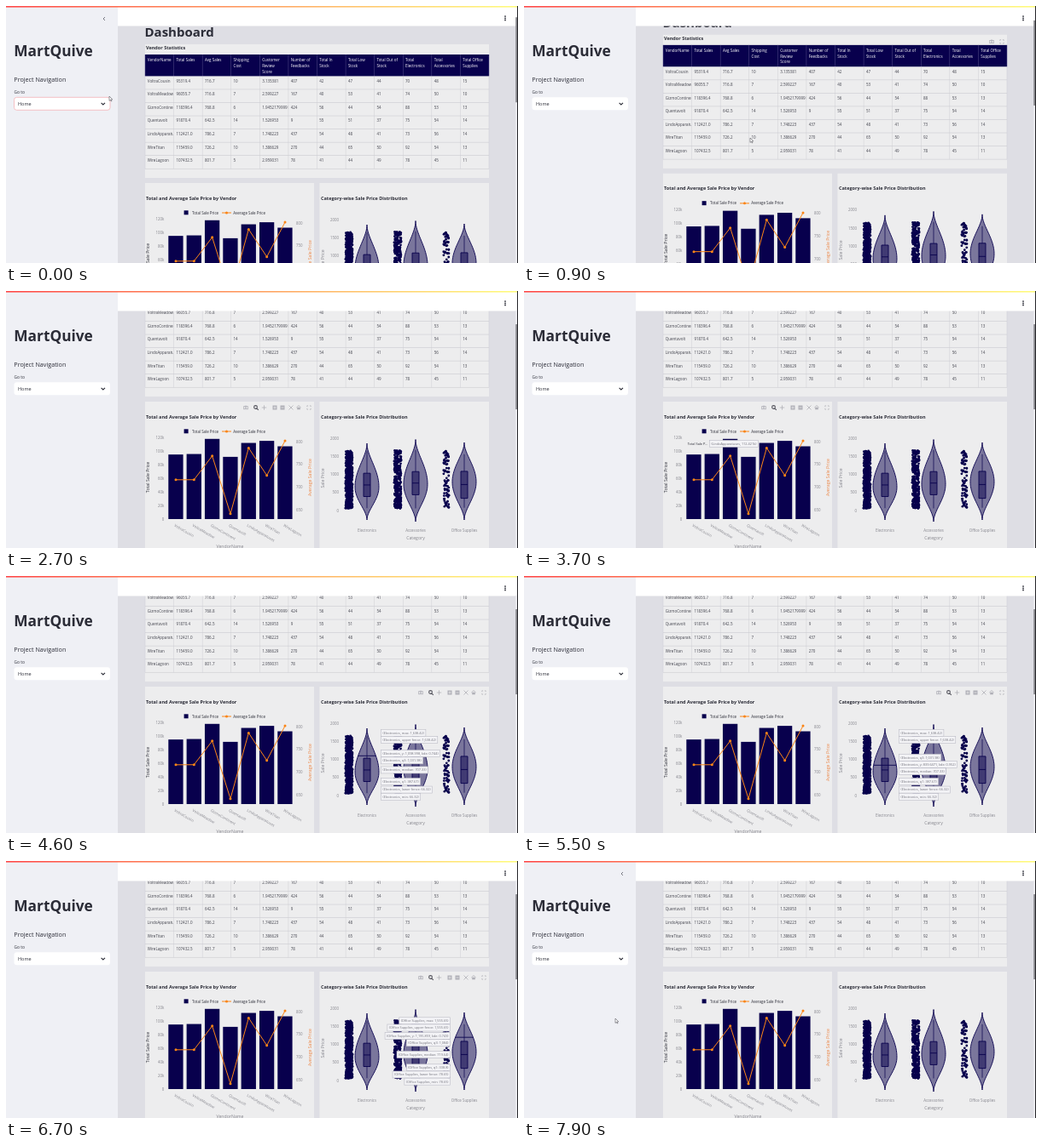
Write an HTML page with a canvas that moves like this. It is 600x302 px and loops after 8000 ms.

```html
<!DOCTYPE html>
<html lang="en">
<head>
<meta charset="utf-8">
<title>Dashboard</title>
<style>
  html, body { margin: 0; width: 100%; height: 100%; overflow: hidden; background: #dedee4; }
  canvas { display: block; width: 600px; height: 302px; }
</style>
</head>
<body>
<canvas id="stage"></canvas>
<script>
const canvas = document.getElementById('stage');
const ctx = canvas.getContext('2d');
const ratio = window.devicePixelRatio || 1;
canvas.width = 600 * ratio;
canvas.height = 302 * ratio;

const LOOP = 8000;
const NAVY = '#08004d', ORANGE = '#fb8516', INK = '#2b2c37', GRAY = '#85858d';
const CARD = '#ededee', PAGE = '#dedee4', SIDE = '#eff0f5';

const columns = ['VendorName', 'Total Sales', 'Avg Sales', 'Shipping|Cost', 'Customer|Review|Score',
  'Number of|Feedbacks', 'Total In|Stock', 'Total Low|Stock', 'Total Out of|Stock',
  'Total|Electronics', 'Total|Accessories', 'Total Office|Supplies'];
const vendors = [
  'VoltraCousin 95319.4 716.7 10 3.135381 407 42 47 44 70 48 15',
  'VoltraMeadow 96055.7 716.8 7 2.599227 167 40 53 41 74 50 10',
  'GizmoContinent 118396.4 768.8 6 1.945217999999 424 56 44 54 88 53 13',
  'Quentavolt 91870.4 642.5 14 1.526953 9 55 51 37 75 54 14',
  'LindoApparatuses 112421.0 786.2 7 1.748223 437 54 48 41 73 56 14',
  'WireTitan 115459.0 726.2 10 1.386629 270 44 65 50 92 54 13',
  'WireLagoon 107432.5 801.7 5 2.959031 78 41 44 49 78 45 11'
].map(row => row.split(' '));

const violins = [
  { name: 'Electronics', x: 423, top: 179, mode: 230.3, bottom: 269, dots: 560, side: 1,
    max: 1638.42, q3: 1031.98, median: 707.33, q1: 387.67, min: 66.32 },
  { name: 'Accessories', x: 480, top: 174.5, mode: 227, bottom: 271, dots: 340, side: -1,
    max: 1674.2, q3: 1077.05, median: 760.18, q1: 437.2, min: 60.41 },
  { name: 'Office Supplies', x: 537, top: 178, mode: 224.4, bottom: 269, dots: 85, side: -1,
    max: 1555.65, q3: 1084, median: 719.64, q1: 338.8, min: 78.65 }
];

// Keys are [time, ...values]
const scrollKeys = [[0, 78], [800, 78], [900, 67], [1400, 0], [LOOP, 0]];
const pointerKeys = [[0, 121, 106], [200, 121, 106], [750, 265, 155], [1900, 265, 155],
  [2400, 241, 200], [2900, 284, 188], [3900, 284, 200], [4400, 423, 210],
  [5400, 423, 222.315], [5800, 423, 222.315], [6300, 537, 215], [6600, 537, 207.176],
  [6900, 537, 207.176], [7600, 107, 185], [LOOP, 107, 185]];

const smooth = k => k * k * (3 - 2 * k);
function sample(keys, t, ease = k => k) {
  const i = keys.findIndex(key => key[0] > t);
  const a = keys[i - 1], b = keys[i];
  const k = ease((t - a[0]) / (b[0] - a[0]));
  return a.slice(1).map((v, n) => v + (b[n + 1] - v) * k);
}

function seeded(seed) {
  return () => (seed = (seed * 16807) % 2147483647) / 2147483647;
}

function rect(x, y, w, h, fill) {
  ctx.fillStyle = fill;
  ctx.fillRect(x, y, w, h);
}

function stroke(points, color, width = 1, fill) {
  ctx.beginPath();
  points.forEach(([x, y]) => ctx.lineTo(x, y));
  if (fill) { ctx.closePath(); ctx.fillStyle = fill; ctx.fill(); }
  ctx.strokeStyle = color;
  ctx.lineWidth = width;
  ctx.stroke();
}

function dot(x, y, r, fill) {
  ctx.beginPath();
  ctx.arc(x, y, r, 0, Math.PI * 2);
  ctx.fillStyle = fill;
  ctx.fill();
}

function setFont(size, weight = 400) {
  ctx.font = `${weight} ${size}px "Open Sans", "Noto Sans", sans-serif`;
}

// y is the middle of the capital letters
function text(str, x, y, size, color = INK, align = 'left', weight = 400) {
  setFont(size, weight);
  ctx.textAlign = align;
  ctx.fillStyle = color;
  ctx.fillText(str, x, y + size * 0.36);
}

function turned(str, x, y, angle, size, color, align) {
  ctx.save();
  ctx.translate(x, y);
  ctx.rotate(angle * Math.PI / 180);
  text(str, 0, 0, size, color, align);
  ctx.restore();
}

const icons = {
  camera(x, y) { ctx.strokeRect(x - 2.3, y - 1.4, 4.6, 3.2); rect(x - 1, y - 2.2, 2, 1, ctx.strokeStyle); dot(x, y + .2, .9, ctx.strokeStyle); },
  zoom(x, y) {
    ctx.beginPath(); ctx.arc(x - .5, y - .5, 1.9, 0, 7);
    ctx.moveTo(x + .8, y + .8); ctx.lineTo(x + 2.8, y + 2.8); ctx.stroke();
  },
  pan(x, y) {
    ctx.beginPath(); ctx.moveTo(x - 2.7, y); ctx.lineTo(x + 2.7, y);
    ctx.moveTo(x, y - 2.7); ctx.lineTo(x, y + 2.7); ctx.stroke();
  },
  plus(x, y) { rect(x - 2.5, y - 2.5, 5, 5, ctx.strokeStyle); rect(x - 1.6, y - .35, 3.2, .7, CARD); rect(x - .35, y - 1.6, .7, 3.2, CARD); },
  minus(x, y) { rect(x - 2.5, y - 2.5, 5, 5, ctx.strokeStyle); rect(x - 1.6, y - .35, 3.2, .7, CARD); },
  fit(x, y) {
    ctx.beginPath(); ctx.moveTo(x - 2.5, y - 2.5); ctx.lineTo(x + 2.5, y + 2.5);
    ctx.moveTo(x + 2.5, y - 2.5); ctx.lineTo(x - 2.5, y + 2.5); ctx.stroke();
  },
  home(x, y) { rect(x - 1.8, y - .3, 3.6, 2.6, ctx.strokeStyle); stroke([[x - 2.7, y], [x, y - 2.5], [x + 2.7, y]], ctx.strokeStyle, .8); },
  full(x, y) {
    for (const sx of [-1, 1]) for (const sy of [-1, 1])
      stroke([[x + sx * .9, y + sy * 2.2], [x + sx * 2.2, y + sy * 2.2], [x + sx * 2.2, y + sy * .9]], ctx.strokeStyle, .7);
  }
};
const chartTools = { camera: 0, zoom: 12, pan: 21.5, plus: 34, minus: 43, fit: 53, home: 62, full: 74 };

function toolbar(x, y, tools) {
  for (const name in tools) {
    const active = name === 'zoom';
    ctx.strokeStyle = active ? '#55555e' : '#b0b0b7';
    ctx.lineWidth = active ? 1.1 : .8;
    icons[name](x + tools[name], y);
  }
}

// side is the direction in which the box extends from x; returns its far edge
function label(str, x, y, side) {
  setFont(3.85);
  const width = ctx.measureText(str).width + 4;
  const left = side > 0 ? x : x - width;
  rect(left, y - 4, width, 8, '#f3f3f6');
  ctx.strokeStyle = '#bcbcc6';
  ctx.lineWidth = .6;
  ctx.strokeRect(left, y - 4, width, 8);
  text(str, left + 2, y, 3.85, '#73737d');
  return x + side * width;
}

function drawTable(hovered) {
  text('Dashboard', 162.5, -47.7, 15, INK, 'left', 700);
  rect(163, -33, 403, 157, CARD);
  text('Vendor Statistics', 164, -29, 5.5, INK, 'left', 700);
  const step = 403 / 12, rowH = 15.55, top = 4.4;
  rect(163, -21, 403, 25.4, NAVY);
  for (let i = 0; i <= 12; i++) {
    rect(163 + step * i - .25, -21, .5, 25.4, '#55508a');
    rect(163 + step * i - .25, top, .5, rowH * 7, '#cfcfd5');
  }
  for (let r = 1; r <= 7; r++) rect(163, top + r * rowH - .3, 403, .6, '#cbcbd1');
  columns.forEach((title, i) => {
    const x = 163 + step * i;
    title.split('|').forEach((line, n) => text(line, x + 2.8, -14.5 + n * 6.7, 4.5, '#fff'));
    ctx.save();
    ctx.beginPath();
    ctx.rect(x, top, step - .6, 112);
    ctx.clip();
    vendors.forEach((row, r) => text(row[i], x + 2.8, 10.2 + r * rowH, 4.5, '#41424c'));
    ctx.restore();
  });
  if (hovered) toolbar(548, -25, { camera: 0, full: 12 });
}

const barX = i => 199 + 21.33 * i;
const barTop = i => 268 - vendors[i][1] / 120000 * 95.5;

function drawBars(hovered) {
  rect(163, 130, 198, 300, CARD);
  text('Total and Average Sale Price by Vendor', 164, 147.6, 5.52, INK, 'left', 700);
  rect(208.6, 162.3, 5, 5, NAVY);
  text('Total Sale Price', 218, 165, 4.45);
  stroke([[253, 165], [264, 165]], ORANGE, 1);
  dot(258.5, 165, 1.5, ORANGE);
  text('Average Sale Price', 266.3, 165, 4.45);

  for (let k = 0; k <= 6; k++) text(k ? k * 20 + 'k' : '0', 185.3, 268 - k * 15.92, 4.4, GRAY, 'right');
  for (let k = 0; k < 4; k++) text(800 - k * 50, 340, 177 + k * 26.9, 4.4, GRAY);
  turned('Total Sale Price', 166.5, 219, -90, 5.2, INK, 'center');
  turned('Average Sale Price', 356.5, 219, -90, 5.2, '#ec8748', 'center');

  vendors.forEach((row, i) => {
    rect(barX(i) - 8.7, barTop(i), 17.3, 268 - barTop(i), NAVY);
    turned(row[0], barX(i) - 1.5, 275, 30, 4.35, GRAY, 'left');
  });
  const line = vendors.map((row, i) => [barX(i), 177 + (800 - row[2]) * .538]);
  stroke(line, ORANGE, 1);
  line.forEach(([x, y]) => dot(x, y, 1.5, ORANGE));
  text('VendorName', 262.5, 300.5, 5.2, GRAY, 'center');
  if (hovered) toolbar(281, 137, chartTools);
}

function barHover(x, y) {
  const i = vendors.findIndex((_, n) => Math.abs(x - barX(n)) < 8.7 && y > barTop(n) && y < 268);
  if (i < 0) return;
  const side = i > 2 ? -1 : 1;
  const far = label(`(${vendors[i][0]}, ${vendors[i][1] / 1000}k)`, barX(i) + side * 10, barTop(i) + .8, side);
  text('Total Sale P...', far + side * 2.5, barTop(i) + .6, 3.9, INK, side < 0 ? 'right' : 'left');
}

const priceY = v => 258 - v * .0425;
function density(v, y) {
  const u = (y - v.mode) / ((y < v.mode ? v.top : v.bottom) - v.mode);
  return (1 - u * u) ** 2;
}

function drawViolins(hovered) {
  rect(367.5, 130, 198.5, 300, CARD);
  text('Category-wise Sale Price Distribution', 369, 147.6, 5.52, INK, 'left', 700);
  for (let k = 0; k <= 4; k++) text(k * 500, 390, priceY(k * 500), 4.4, GRAY, 'right');
  turned('Sale Price', 371.5, 220, -90, 5.2, GRAY, 'center');
  violins.forEach((v, n) => {
    const rand = seeded(71 + n * 997);
    const spread = n < 2 ? 8 : 6.4;
    for (let i = 0; i < v.dots; i++)
      dot(v.x - 21 + (rand() - .5) * spread, priceY(v.min + rand() ** 1.12 * (1665 - v.min)), 1.4, NAVY);

    const edge = [];
    for (let k = 0; k <= 60; k++) {
      const y = v.top + (v.bottom - v.top) * k / 60;
      edge.push([density(v, y) * 14, y]);
    }
    stroke([...edge.map(([w, y]) => [v.x + w, y]), ...edge.reverse().map(([w, y]) => [v.x - w, y])],
      NAVY, .9, 'rgba(8,0,77,.5)');
    const [max, q3, median, q1, min] = [v.max, v.q3, v.median, v.q1, v.min].map(priceY);
    stroke([[v.x, max], [v.x, q3]], NAVY, .7);
    stroke([[v.x, q1], [v.x, min]], NAVY, .7);
    stroke([[v.x - 4, q3], [v.x + 4, q3], [v.x + 4, q1], [v.x - 4, q1]], NAVY, .9, 'rgba(8,0,77,.5)');
    stroke([[v.x - 4, median], [v.x + 4, median]], NAVY, .9);
    text(v.name, v.x, 281, 4.4, GRAY, 'center');
  });
  text('Category', 480, 290.3, 5.2, GRAY, 'center');
  if (hovered) toolbar(486, 137, chartTools);
}

function violinHover(x, y) {
  const v = violins.find(item => Math.abs(x - item.x) < 14 && y > item.top && y < item.bottom);
  if (!v) return;
  const num = value => value.toLocaleString('en-US', { maximumSignificantDigits: 7 });
  const value = (258 - y) / .0425;
  const tags = [['max', v.max], ['upper fence', v.max], ['q3', v.q3], ['median', v.median],
    ['q1', v.q1], ['lower fence', v.min], ['min', v.min]]
    .map(([key, val]) => ({ str: `${key}: ${num(val)}`, y: priceY(val) }));
  tags.push({ str: `y: ${num(value)}, kde: ${density(v, y).toFixed(3)}`, y });
  tags.sort((a, b) => a.y - b.y);
  // Push overlapping labels apart
  for (let pass = 0; pass < 40; pass++)
    for (let i = 1; i < tags.length; i++) {
      const push = (8.2 - tags[i].y + tags[i - 1].y) / 2;
      if (push > 0) { tags[i].y += push; tags[i - 1].y -= push; }
    }
  const half = density(v, y) * 14;
  stroke([[v.x - half, y], [v.x + half, y]], NAVY, .9);
  tags.forEach(tag => label(`(${v.name}, ${tag.str})`, v.x + v.side * 16.5, tag.y, v.side));
}

function drawHeader(offset) {
  rect(131, 0, 469, 23.5, '#fff');
  for (let k = -1; k <= 1; k++) dot(585, 14.3 + k * 2.2, .9, INK);
  rect(597, 23.5, 3, 279, '#ececf0');
  rect(597.2, (118 - offset) * .331, 1.8, 100, '#85858a');
  rect(599, 0, 1, 302, '#26262a');
}

function drawSidebar(x, y) {
  rect(0, 0, 131, 302, SIDE);
  text('MartQuive', 9.3, 53, 17.3, INK, 'left', 700);
  text('Project Navigation', 9.3, 86, 7.2);
  text('Go to', 9.5, 101, 4.9);
  ctx.beginPath();
  ctx.roundRect(9.5, 107.3, 112.5, 15, 3);
  ctx.fillStyle = '#fff';
  ctx.fill();
  if (x < 124 && y > 104 && y < 123) {
    ctx.strokeStyle = '#f4b3b6';
    ctx.lineWidth = .8;
    ctx.stroke();
  }
  text('Home', 14, 115, 5.5);
  stroke([[111.6, 113.8], [113.8, 116], [116, 113.8]], INK, 1.1);
  if (x < 131) stroke([[116, 13], [114, 15], [116, 17]], '#6c6d78', .9);
}

function drawPointer(x, y) {
  stroke([[x, y], [x, y + 5.4], [x + 1.3, y + 4.2], [x + 2.3, y + 6], [x + 3, y + 5.6], [x + 2.2, y + 3.9], [x + 3.8, y + 3.8]],
    '#55555c', .6, '#fff');
}

function draw(t) {
  const [offset] = sample(scrollKeys, t);
  const [x, y] = sample(pointerKeys, t, smooth);
  const pageY = y - offset;
  const inMain = x > 163 && x < 566;
  const onTable = inMain && pageY < 124;
  const onBars = inMain && x < 361 && pageY > 130;
  const onViolins = x > 367.5 && x < 566 && pageY > 130;

  ctx.setTransform(ratio, 0, 0, ratio, 0, 0);
  rect(0, 0, 600, 302, PAGE);
  ctx.save();
  ctx.translate(0, offset);
  drawTable(onTable);
  drawBars(onBars);
  drawViolins(onViolins);
  barHover(x, pageY);
  violinHover(x, pageY);
  ctx.restore();
  drawHeader(offset);
  drawSidebar(x, y);

  const glow = ctx.createLinearGradient(0, 0, 600, 0);
  glow.addColorStop(0, '#ff4b4b');
  glow.addColorStop(1, '#fffd80');
  rect(0, 0, 599, 1.6, glow);
  if (!onBars && !onViolins) drawPointer(x, y);
}

function frame() {
  draw(performance.now() % LOOP);
  requestAnimationFrame(frame);
}
frame();
</script>
</body>
</html>
```
